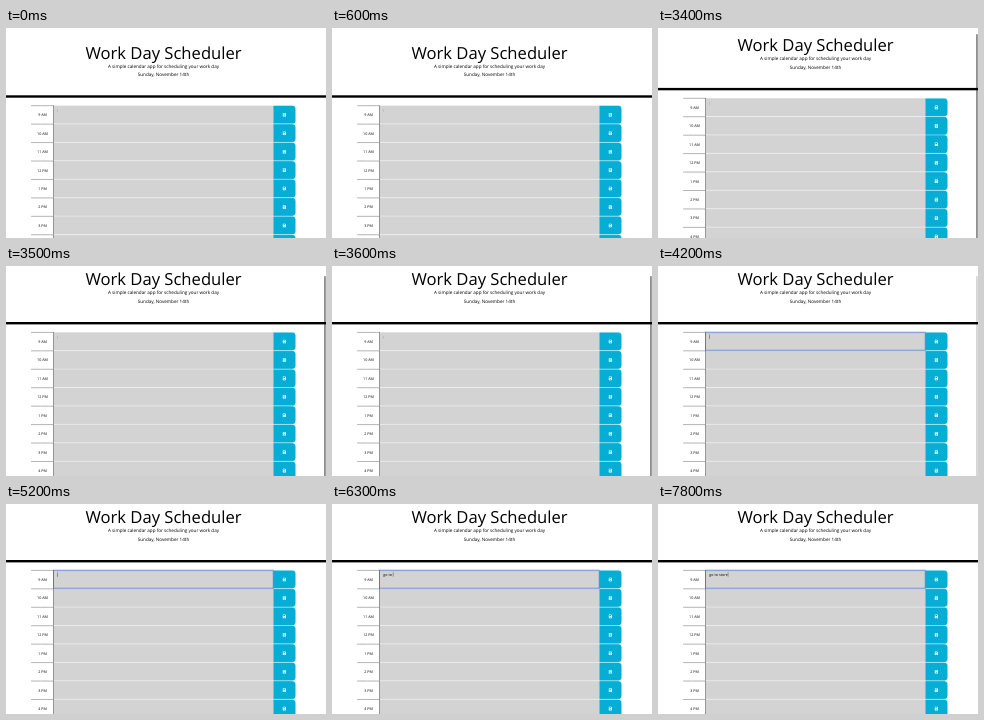
Write an HTML page that moves like this. It is 320x210 px and loops after 8000 ms.

```html
<!DOCTYPE html>
<html lang="en">
<head>
<meta charset="utf-8">
<title>Work Day Scheduler</title>
<style>
  html, body { margin: 0; width: 100%; height: 100%; overflow: hidden; background: #fff; }
  svg { display: block; width: 320px; height: 210px; }
  text { font: 4.61px "Open Sans", sans-serif; text-rendering: geometricPrecision; text-anchor: middle; }
  .title { font-size: 16.63px; }
  .hour { font-size: 3.69px; }
  .entry { font-size: 3.69px; text-anchor: start; }
  .slot { fill: #d3d3d3; }
  .btn { fill: #06aed5; }
  .gap { stroke: #fff; stroke-width: .4; }
  .dash { stroke: #000; stroke-width: .4; stroke-dasharray: .7 .2; }
  .edge { stroke: #000; stroke-width: .35; }
  .ring { fill: none; stroke: #3a74c6; stroke-width: .75; }
  .caret line { stroke: #111; stroke-width: .35; }

  .page, .thumb, .ring, .typing, .caret { animation: 8s step-end infinite; }
  .page { animation-name: scroll; }
  .thumb { animation-name: thumb; }
  .ring { animation-name: focus; }
  .typing { animation-name: type; }
  .caret { animation-name: blink; }

  @keyframes scroll {
    0% { transform: translateY(0); }
    42.5% { transform: translateY(-7.4px); }
    43.75%, 100% { transform: translateY(-11.3px); }
  }
  @keyframes thumb {
    0% { opacity: 0; transform: translateY(0); }
    42.5% { opacity: .55; transform: translateY(6.2px); }
    43.75% { opacity: .55; transform: translateY(10.2px); }
    51.25% { opacity: .45; transform: translateY(10.2px); }
    52.5% { opacity: .2; transform: translateY(10.2px); }
    53.75%, 100% { opacity: 0; transform: translateY(10.2px); }
  }
  @keyframes focus {
    0% { opacity: 0; }
    52.5%, 100% { opacity: 1; }
  }
  @keyframes blink {
    0%, 58.75%, 85% { opacity: 0; }
    52.5%, 65%, 86.25%, 100% { opacity: 1; }
  }
  /* one stop per key press */
  @keyframes type {
    0% { transform: translateX(0); }
    71.25% { transform: translateX(2.01px); }
    72.5% { transform: translateX(4.24px); }
    73.75% { transform: translateX(5.2px); }
    76.25% { transform: translateX(6.5px); }
    77.5% { transform: translateX(8.73px); }
    78.75% { transform: translateX(9.69px); }
    86.25% { transform: translateX(11.45px); }
    90% { transform: translateX(12.75px); }
    93.75% { transform: translateX(14.98px); }
    96.25% { transform: translateX(16.49px); }
    97.5%, 100% { transform: translateX(18.6px); }
  }
</style>
</head>
<body>
<svg viewBox="0 0 320 210">
  <defs>
    <g id="save">
      <path fill="#fff" d="M-1.6-1.5q0-.3.3-.3H.9L1.6-1.1V1.5q0 .3-.3.3H-1.3q-.3 0-.3-.3z"/>
      <path fill="#06aed5" d="M-1.1-1.3H.6V-.4H-1.1z"/>
      <circle fill="#06aed5" cy=".75" r=".5"/>
    </g>
  </defs>
  <g class="page">
    <text class="title" x="157.5" y="30.6">Work Day Scheduler</text>
    <text x="157.5" y="39.7">A simple calendar app for scheduling your work day</text>
    <text x="157.5" y="48.1">Sunday, November 14th</text>
    <rect y="67.3" width="320" height="2.4"/>
    <g id="rows"></g>
    <text class="entry" x="51.3" y="83">go to store</text>
    <g class="typing">
      <rect class="slot" x="51.3" y="79" width="24" height="6"/>
      <g class="caret"><line x1="51.4" x2="51.4" y1="79.5" y2="84.1"/></g>
    </g>
    <rect class="ring" x="47.6" y="77.7" width="219.6" height="18"/>
  </g>
  <rect class="thumb" x="318.2" width="1.5" height="210" rx=".7"/>
</svg>
<script>
  const top0 = 77.4, pitch = 18.44;
  const label = h => `${h > 12 ? h - 12 : h} ${h < 12 ? 'AM' : 'PM'}`;

  const row = (_, i) => `<g transform="translate(0 ${top0 + i * pitch})">
    <rect class="slot" x="47.4" width="220" height="${pitch}"/>
    <path class="btn" d="M267.4 .2H286q3.5 0 3.5 3.5V15q0 3.44-3.5 3.44H267.4z"/>
    <line class="gap" x1="47.4" x2="289.5" y1=".1" y2=".1"/>
    <line class="dash" x1="25.2" x2="47.4" y1=".3" y2=".3"/>
    <line class="edge" x1="47.5" x2="47.5" y2="${pitch}"/>
    <text class="hour" x="36.5" y="10.8">${label(9 + i)}</text>
    <use href="#save" x="278.4" y="9.4"/>
  </g>`;

  document.getElementById('rows').innerHTML = Array.from({ length: 9 }, row).join('');
</script>
</body>
</html>
```
